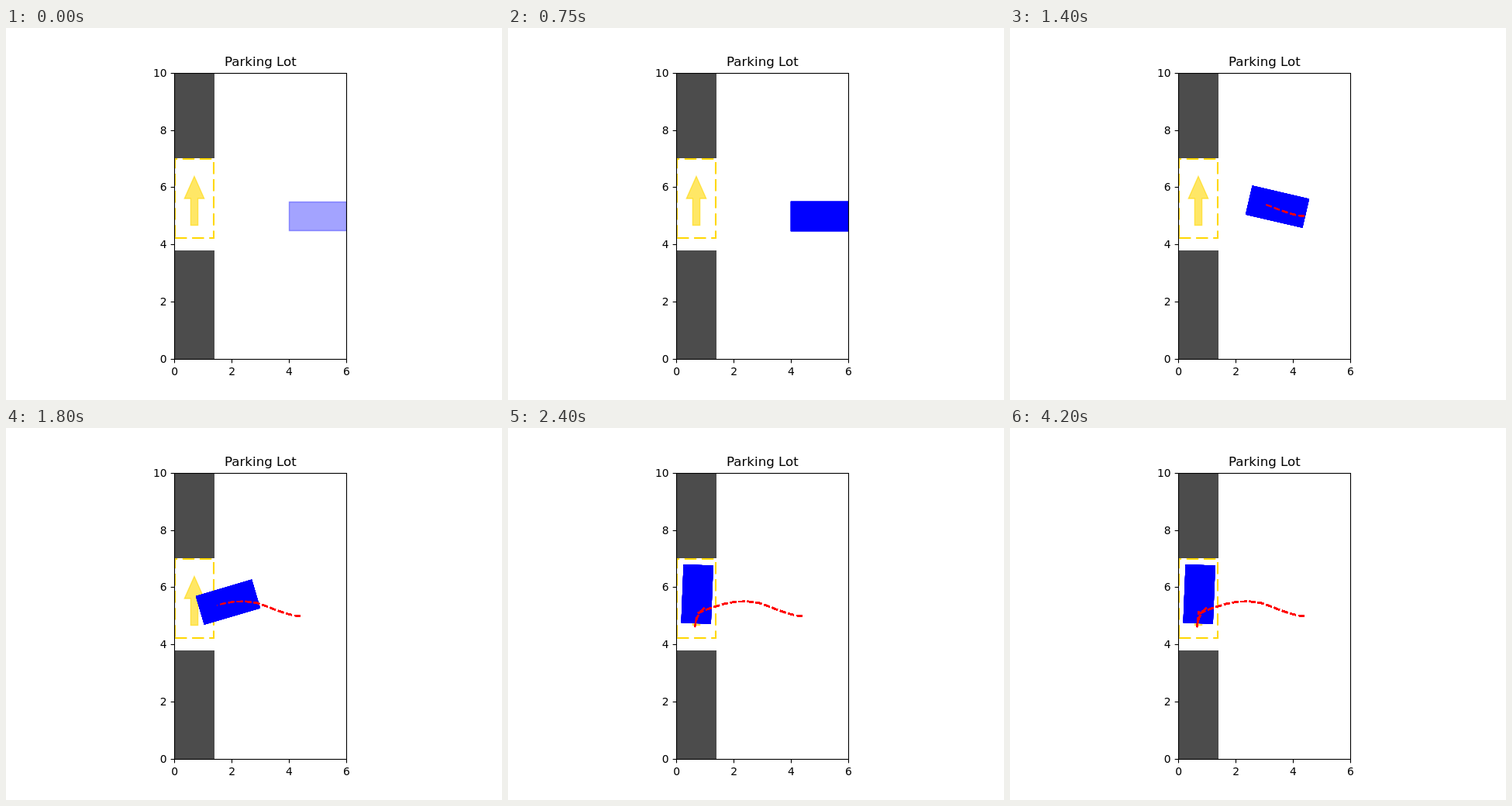
Recreate the animation shown at these times as an HTML page with a canvas. Size 640 by 480 pixels, loop 4500 ms.

```html
<!DOCTYPE html>
<html lang="en">
<head>
<meta charset="utf-8">
<title>Parking Lot</title>
<style>
html, body { margin: 0; width: 100%; height: 100%; overflow: hidden; background: #fff; }
canvas { display: block; }
</style>
</head>
<body>
<canvas id="stage" width="640" height="480"></canvas>
<script>
const ctx = document.getElementById('stage').getContext('2d');
const LOOP = 4500, STEP = 50, UNIT = 36.96;
const LEFT = 217.12, RIGHT = 438.88, TOP = 57.6, BOTTOM = 427.2;
const START = 18, STOP = 48;
const px = x => LEFT + x * UNIT;
const py = y => BOTTOM - y * UNIT;
const snap = v => Math.round(v) + 0.5;

// Rear axle waypoints: step, x, y, heading in degrees
const route = [
  [18, 379.8, 242.4, 0], [20, 371.7, 241.9, -8], [22, 361, 239.3, -20],
  [24, 348.5, 234.9, -22], [26, 336, 230, -19], [28, 323.4, 225.6, -13],
  [30, 308.7, 223.8, -4], [32, 294, 224.1, 5], [34, 279.4, 226.8, 12],
  [36, 265.2, 231, 16.5], [37, 258.2, 233.4, 22], [38, 251.5, 236, 27],
  [39, 245, 239, 33], [40, 250.2, 235.4, 39], [41, 254.2, 231, 45],
  [42, 249.2, 236.7, 51], [43, 244.8, 243, 56], [44, 242.3, 250, 65],
  [45, 241, 257, 73], [46, 242.3, 250, 79], [47, 243, 243, 84],
  [48, 243.3, 236.5, 87.7]
];

function poseAt(step) {
  const s = Math.min(Math.max(step, START), STOP);
  const i = Math.min(route.findLastIndex(p => p[0] <= s), route.length - 2);
  const a = route[i], b = route[i + 1];
  const f = (s - a[0]) / (b[0] - a[0]);
  const [x, y, deg] = [1, 2, 3].map(c => a[c] + (b[c] - a[c]) * f);
  return { x, y, angle: -deg * Math.PI / 180 };
}

const poses = Array.from({ length: STOP + 1 }, (_, i) => poseAt(i));

function line(points, close) {
  ctx.beginPath();
  points.forEach(([x, y]) => ctx.lineTo(x, y));
  if (close) ctx.closePath();
}

function drawLot() {
  ctx.fillStyle = '#4c4c4c';
  ctx.fillRect(217, 58, 52, 110);
  ctx.fillRect(217, 287, 52, 140);

  ctx.strokeStyle = '#ffd700';
  ctx.lineWidth = 2.08;
  ctx.setLineDash([15.4, 6.7]);
  line([[218, 271], [268, 271], [268, 169], [218, 169]], true);
  ctx.stroke();
  ctx.setLineDash([]);

  ctx.globalAlpha = 0.6;
  ctx.fillStyle = '#ffd700';
  ctx.lineWidth = 1.39;
  line([[243, 191.5], [255.7, 220], [247.6, 220], [247.6, 254.5],
        [238.4, 254.5], [238.4, 220], [230.3, 220]], true);
  ctx.fill();
  ctx.stroke();
  ctx.globalAlpha = 1;
}

function carCorners(step) {
  if (step <= START) {
    const x0 = snap(px(4)), x1 = snap(px(6)), y0 = snap(py(5.5)), y1 = snap(py(4.5));
    return [[x0, y0], [x1, y0], [x1, y1], [x0, y1]];
  }
  const { x, y, angle } = poses[Math.min(step, STOP)];
  const c = Math.cos(angle), s = Math.sin(angle);
  return [[-0.4, -0.5], [1.6, -0.5], [1.6, 0.5], [-0.4, 0.5]].map(([u, v]) =>
    [x + (u * c - v * s) * UNIT, y + (u * s + v * c) * UNIT]);
}

// The translucent body is stacked once more on every step
function drawCar(step) {
  ctx.fillStyle = ctx.strokeStyle = '#00f';
  ctx.globalAlpha = 0.36;
  ctx.lineWidth = 1.39;
  line(carCorners(step), true);
  for (let n = Math.min(step, 24); n >= 0; n--) {
    ctx.fill();
    ctx.stroke();
  }
  ctx.globalAlpha = 1;
}

// Each step adds a dashed line over the previous ones
function drawTrail(step) {
  ctx.strokeStyle = '#f00';
  ctx.lineWidth = 2.08;
  ctx.setLineDash([7.7, 3.33]);
  for (let end = START + 1; end < Math.min(step, STOP + 6); end++) {
    line(poses.slice(START, end + 1).map(p => [p.x, p.y]));
    ctx.stroke();
  }
  ctx.setLineDash([]);
}

function drawAxes() {
  ctx.strokeStyle = ctx.fillStyle = '#000';
  ctx.lineWidth = 1.11;
  const x0 = snap(LEFT), x1 = snap(RIGHT), y0 = snap(TOP), y1 = snap(BOTTOM);
  ctx.strokeRect(x0, y0, x1 - x0, y1 - y0);

  ctx.font = '13.89px "DejaVu Sans", sans-serif';
  ctx.textAlign = 'center';
  for (let v = 0; v <= 6; v += 2) {
    const x = snap(px(v));
    line([[x, y1], [x, y1 + 4.86]]);
    ctx.stroke();
    ctx.fillText(v, px(v) + 0.5, 448);
  }
  ctx.textAlign = 'right';
  for (let v = 0; v <= 10; v += 2) {
    const y = snap(py(v));
    line([[x0, y], [x0 - 4.86, y]]);
    ctx.stroke();
    ctx.fillText(v, 207.6, Math.round(py(v)) + 5);
  }
  ctx.textAlign = 'center';
  ctx.font = '16.67px "DejaVu Sans", sans-serif';
  ctx.fillText('Parking Lot', 328.4, 49);
}

function draw(step) {
  ctx.fillStyle = '#fff';
  ctx.fillRect(0, 0, 640, 480);
  ctx.save();
  ctx.beginPath();
  ctx.rect(217, 58, 222, 369);
  ctx.clip();
  drawLot();
  drawCar(step);
  drawTrail(step);
  ctx.restore();
  drawAxes();
}

const begin = performance.now();
let shown = -1;

function tick() {
  const step = Math.floor((performance.now() - begin) % LOOP / STEP);
  if (step !== shown) draw(shown = step);
  requestAnimationFrame(tick);
}
tick();
</script>
</body>
</html>
```
